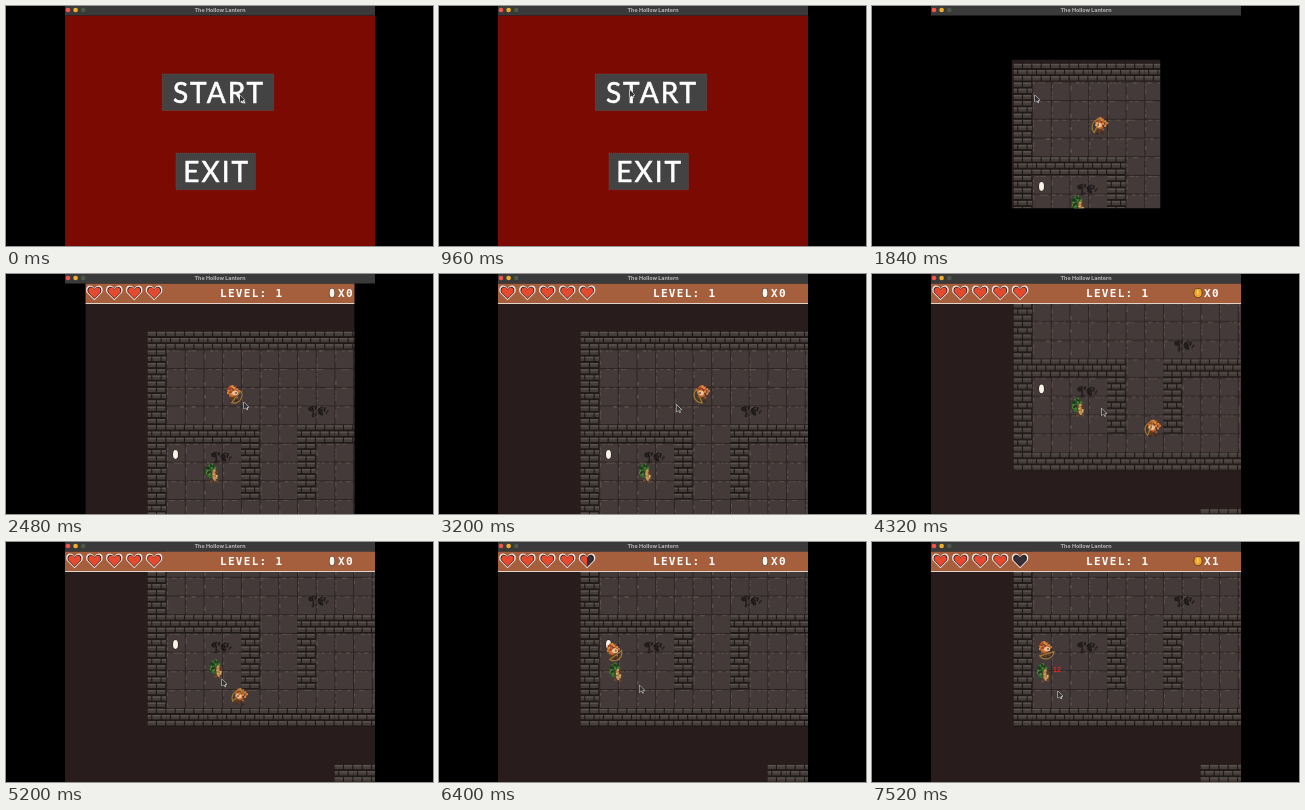
An HTML page with a canvas for the animation above (7600 ms loop, 427 by 240 pixels).

```html
<!DOCTYPE html>
<html lang="en">
<meta charset="utf-8">
<title>Dungeon game</title>
<style>
html, body { margin: 0; width: 100%; height: 100%; overflow: hidden; background: #000 }
canvas { display: block; width: 427px; height: 240px }
</style>
<canvas id="stage" width="427" height="240"></canvas>
<script>
const LOOP = 7600, STEP = 80, TILE = 18.7, LEFT = 141.7, TOP = 57;
const MONO = '"DejaVu Sans Mono", monospace';
const FOG = 1050, PICKUP = 6500, HITS = [6100, 6900];
let g = document.getElementById('stage').getContext('2d');

// Keys are [time, x, y]; positions run straight from one key to the next.
const mouse = [[0, 234, 89], [480, 191, 84], [1120, 191, 84], [1840, 163, 89],
  [2480, 238, 128], [3840, 237, 133], [5200, 216, 137], [7520, 186, 149]];
const hero = [[2850, 228, 120], [3380, 281, 120], [4440, 281, 233], [4800, 281, 233],
  [5200, 234, 233], [PICKUP, 170, 184], [7520, 174, 186]];
const foe = [[4900, 207, 199], [5200, 211, 205], [6600, 172, 209]];

function at(keys, t) {
  const i = keys.findIndex(k => k[0] > t);
  if (i < 1) return keys.at(i).slice(1);
  const [a, b] = [keys[i - 1], keys[i]], f = (t - a[0]) / (b[0] - a[0]);
  return [a[1] + (b[1] - a[1]) * f, a[2] + (b[2] - a[2]) * f];
}

function seeded(seed) {
  return () => (seed = seed * 16807 % 2147483647) / 2147483647;
}

function box(color, x, y, w, h) {
  g.fillStyle = color;
  g.fillRect(x, y, w, h);
}

function dot(color, x, y, rx, ry = rx) {
  g.fillStyle = color;
  g.beginPath();
  g.ellipse(x, y, rx, ry, 0, 0, 7);
  g.fill();
}

// Scatters small squares of the given colours over an ellipse.
function speckle(colors, x, y, rx, ry, size = 2) {
  const rand = seeded(4711);
  for (let i = 0; i < rx * ry * 1.5; i++) {
    const a = rand() * 2 * Math.PI, d = Math.sqrt(rand());
    const color = colors[Math.floor(rand() * colors.length)];
    box(color, x + Math.cos(a) * d * rx - size / 2, y + Math.sin(a) * d * ry - size / 2, size, size);
  }
}

function label(text, x, y, font, color, gap = 0, align = 'left') {
  g.font = font;
  g.fillStyle = color;
  g.letterSpacing = gap + 'px';
  g.textAlign = align;
  g.fillText(text, x, y);
}

function isWall(c, r) {
  if (r == 0 || r == 10) return true;
  if (r > 10) return r == 13 && c >= 10;
  return c == 0 || (r == 5 && (c < 6 || c > 7)) || (r > 5 && r < 9 && (c == 5 || c == 8));
}

function wallTile(x, y) {
  const w = TILE / 2, h = TILE / 3;
  box('#1f1918', x, y, TILE + .3, TILE + .3);
  for (let row = 0; row < 3; row++) {
    for (let bx = -(row % 2) * w / 2; bx < TILE; bx += w) {
      const a = Math.max(0, bx), b = Math.min(TILE, bx + w - 1.2);
      box('#453d3a', x + a, y + row * h + .8, b - a, h - 2);
      box('#5b534f', x + a, y + row * h + .8, b - a, 1.4);
    }
  }
}

function floorTile(x, y, rand) {
  box('#453a3a', x, y, TILE + .3, TILE + .3);
  box('#2d2525', x - .3, y, 1, TILE);
  box('#2d2525', x, y - .3, TILE, 1);
  for (let i = 0; i < 3; i++) {
    box('#5c504b', x + .7, y + rand() * 15, 1, 3);
    box('#5c504b', x + rand() * 15, y + .7, 3, 1);
  }
}

function scorch(x, y) {
  const dark = ['#1b1718', '#231d1e'];
  speckle(dark, x - 4, y - 2, 6, 2.5, 1.5);
  speckle(dark, x + 5, y, 5, 4, 1.5);
  speckle(dark, x - 4, y + 4, 2, 2, 1.5);
}

function makeMap() {
  const map = document.createElement('canvas'), screen = g, rand = seeded(99);
  map.width = 427;
  map.height = 330;
  g = map.getContext('2d');
  box('#291c1c', 0, 0, 427, 330);
  for (let r = 0; r < 14; r++) for (let c = 0; c < 13; c++) {
    const x = LEFT + c * TILE, y = TOP + r * TILE;
    if (isWall(c, r)) wallTile(x, y);
    else if (r < 10) floorTile(x, y, rand);
  }
  scorch(215, 183);
  scorch(312, 137);
  g = screen;
  return map;
}

function coin(x, y, t) {
  const phase = t % 640, gold = phase >= 160 && phase < 520;
  const w = gold ? 3.8 : 2.5;
  dot('#2b1d16', x, y, w + .6, 5);
  dot(gold ? '#eda52b' : '#f8f4ea', x, y, w, 4.4);
  if (gold) box('#ffd76a', x - 1, y - 2.5, 1.5, 4);
}

function feet(color, x, y, t) {
  const step = t % 320 < 160 ? 1 : -1;
  box(color, x - 4, y - step / 2, 3, 2);
  box(color, x + 1, y + step / 2, 3, 2);
}

function drawHero(x, y, t, aim) {
  const side = aim[0] < x ? -1 : 1;
  feet('#3f271f', x, y + 6, t);
  speckle(['#6d3c22', '#a8632e', '#5a3a24'], x, y + 3, 4, 4);
  speckle(['#a8481f', '#c8652c', '#e08a3e'], x - side, y - 3, 6, 5);
  dot('#edbf95', x + side, y - 1, 3, 2.5);
  box('#3a2420', x + side * 2 - .5, y - 2, 1, 2);
  // bow turned to the pointer
  g.save();
  g.translate(x, y + 1);
  g.rotate(Math.atan2(aim[1] - y, aim[0] - x));
  g.lineWidth = 1.2;
  g.strokeStyle = '#a07a34';
  g.beginPath();
  g.arc(0, 0, 8, -1.2, 1.2);
  g.closePath();
  g.stroke();
  g.restore();
}

function drawFoe(x, y, t, side) {
  const greens = ['#1f3a1e', '#2f6a2c', '#4b8a33'];
  feet('#6b4a2c', x + side, y + 7, t);
  speckle(greens, x - side * 2, y - 2, 5, 6);
  speckle(greens, x, y - 6, 3, 3);
  dot('#5b3d25', x + side * 2, y + 2, 3.5, 6);
  speckle(['#b98a50', '#dfb674', '#c99a5c'], x + side * 2, y + 2, 2, 5);
}

function heartPath(x, y, s) {
  g.beginPath();
  g.moveTo(x, y + 7 * s);
  for (const side of [-1, 1]) {
    const px = side * s, top = [x + 3 * px, y - 10 * s], out = [x + 10 * px, y - 7 * s];
    if (side < 0) {
      g.lineTo(x + 7.5 * px, y - .5 * s);
      g.bezierCurveTo(...out, ...top, x, y - 4 * s);
    } else g.bezierCurveTo(...top, ...out, x + 7.5 * px, y - .5 * s);
  }
  g.closePath();
}

function heart(x, y, fill) {
  for (const [color, size] of [['#f2e6dc', 1.03], ['#2c2027', .86], ['#343038', .7]]) {
    heartPath(x, y, size);
    g.fillStyle = color;
    g.fill();
  }
  g.save();
  g.beginPath();
  g.rect(x - 9, y - 9, 18 * fill, 18);
  g.clip();
  heartPath(x, y, .76);
  g.fillStyle = '#e5492e';
  g.fill();
  g.restore();
}

function hud(t) {
  const write = (text, x) => label(text, x, 23, `bold 11px ${MONO}`, '#fff', 1.3);
  const health = 5 - HITS.filter(hit => t >= hit).length / 2;
  box('#a55f3d', 59, 9.5, 310, 19.5);
  box('#e3d2c8', 59, 29, 310, 1);
  for (let i = 0; i < 5; i++) heart(68.5 + 19.9 * i, 19, Math.max(0, Math.min(1, health - i)));
  write('LEVEL: 1', 214);
  coin(326, 19, t);
  write(t < PICKUP ? 'X0' : 'X1', 332);
}

function button(text, mid, y, w) {
  box('#434343', mid - w / 2, y, w, 36.5);
  g.strokeStyle = '#666';
  g.lineWidth = .6;
  g.setLineDash([1, 1]);
  g.strokeRect(mid - w / 2, y, w, 36.5);
  g.setLineDash([]);
  label(text, mid + 1, y + 29, '28px Lato, sans-serif', '#fff', 2, 'center');
  g.strokeStyle = '#fff';
  g.strokeText(text, mid + 1, y + 29);
}

function menu() {
  box('#7b0a02', 59, 9.5, 310, 231);
  button('START', 212, 68, 111.5);
  button('EXIT', 209.7, 147.2, 79.5);
}

function game(t, pointer) {
  const [hx, hy] = at(hero, t), [fx, fy] = at(foe, t);
  const lowest = Math.max(...hero.filter(k => k[0] <= t).map(k => k[2]), hy);
  const cam = Math.max(0, Math.min(78, lowest - 154.5));
  const half = (t - FOG) * .094;
  g.save();
  g.beginPath();
  g.rect(214 - half, 128 - half, half * 2, half * 2);
  g.clip();
  g.drawImage(map, 0, -cam);
  if (t < PICKUP) coin(169.5, 180.5 - cam, 0);
  drawFoe(fx, fy - cam, t, 1);
  drawHero(hx, hy - cam, t, pointer);
  if (t >= 7200) label('12', 185, 130 + (7520 - t) / 40, `bold 7px ${MONO}`, '#e3261c', 0, 'center');
  hud(t);
  g.restore();
}

function titleBar() {
  box('#3b3a3a', 59, 0, 310, 9.5);
  ['#f0564c', '#efb02e', '#4d5a48'].forEach((c, i) => dot(c, 62 + 7.6 * i, 4, 2.3));
  label('The Hollow Lantern', 214, 6, 'bold 5.4px Inter, sans-serif', '#b9b7b7', 0, 'center');
}

function cursor(x, y) {
  g.beginPath();
  g.moveTo(x, y);
  g.lineTo(x, y + 7);
  g.lineTo(x + 2, y + 5.5);
  g.lineTo(x + 3.5, y + 8);
  g.lineTo(x + 3, y + 5);
  g.lineTo(x + 5, y + 5);
  g.closePath();
  g.lineWidth = 1;
  g.strokeStyle = '#eee';
  g.fillStyle = '#333';
  g.stroke();
  g.fill();
}

const map = makeMap();

function frame() {
  const t = Math.floor(performance.now() % LOOP / STEP) * STEP;
  const pointer = at(mouse, t);
  box('#000', 0, 0, 427, 240);
  g.save();
  g.beginPath();
  g.rect(59, 0, 310, 240);
  g.clip();
  if (t < 1120) menu();
  else game(t, pointer);
  titleBar();
  cursor(...pointer);
  g.restore();
  requestAnimationFrame(frame);
}
frame();
</script>
</html>
```
